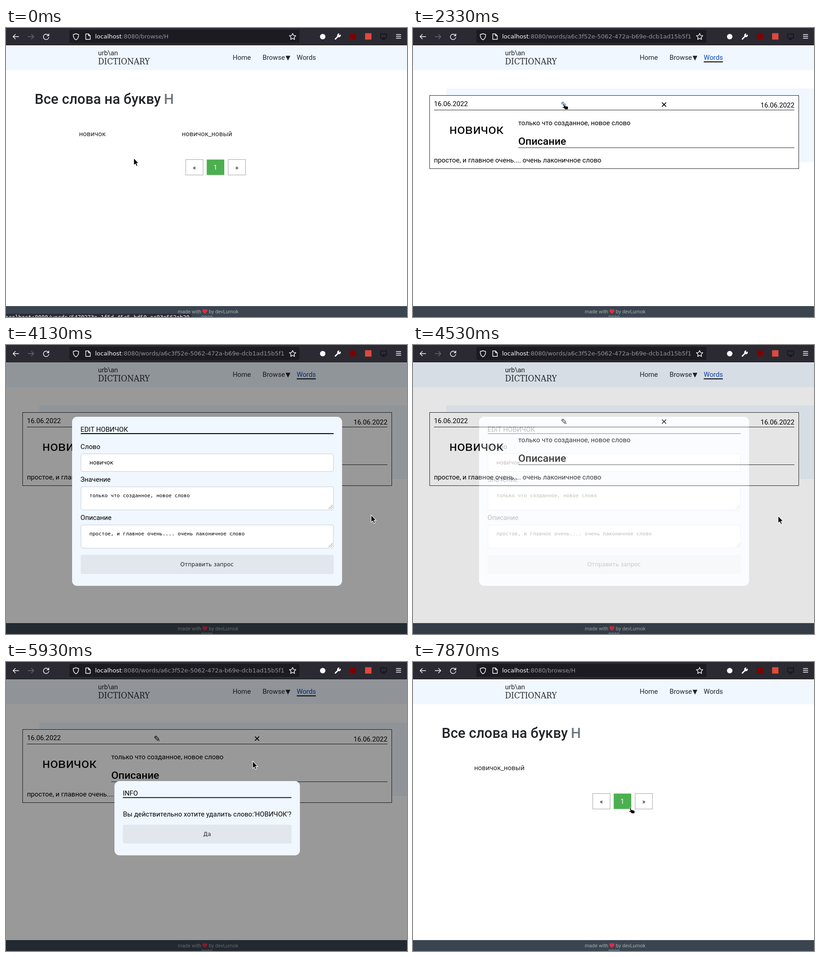
Write an HTML page that moves like this. It is 880 px wide and 636 px high and loops after 8000 ms.

```html
<!DOCTYPE html>
<html lang="ru">
<head>
<meta charset="utf-8">
<title>Dictionary</title>
<style>
html, body { margin: 0; width: 100%; height: 100%; overflow: hidden; background: #fff; }
svg { display: block; width: 880px; height: 636px; }
text { font: 14.8px Roboto, sans-serif; fill: #000; white-space: pre; }
.nav text, .list { fill: #212529; }
.logo { font: 18.5px "DejaVu Serif Condensed", "Noto Serif", serif; }
.h1 { font-size: 30.8px; font-weight: 500; }
.h2 { font-size: 30.2px; }
.h3 { font-size: 22.9px; font-weight: 500; }
.sym { font: 17.8px "DejaVu Sans", sans-serif; }
.caret { font: 13.8px "DejaVu Sans", sans-serif; }
.ui { font: 12.2px "DejaVu Sans", sans-serif; }
.mono { font: 11.1px "DejaVu Sans Mono", monospace; }
.status { font: 12px "DejaVu Sans Mono", monospace; fill: #fbfbfe; }
.url { font: 13px "DejaVu Sans", sans-serif; fill: #93929c; }
.foot text { font-size: 11.1px; fill: #a7abb0; }
.mid { text-anchor: middle; }
.end { text-anchor: end; }
.icon { fill: none; stroke: #fbfbfe; stroke-width: 1.4; stroke-linecap: round; stroke-linejoin: round; }
.rule { stroke: #000; stroke-width: 1.8; fill: none; }
.line { stroke: #212529; fill: #fff; }
.field { fill: #fff; stroke: #c8ccd1; }
.grip { stroke: #777; stroke-width: 1; fill: none; }
.panel { fill: #f0f7ff; }
.button { fill: #e2e6ed; }
.cursor path { fill: #000; stroke: #fff; stroke-width: 1; stroke-linejoin: round; }
</style>
</head>
<body>
<svg viewBox="0 0 880 636">
  <rect width="880" height="636" fill="#fff"/>

  <g id="browse">
    <text class="h1" x="63" y="167" style="fill:#212529">Все слова на букву</text>
    <text class="h1" x="346.5" y="167" style="fill:#6c757d">Н</text>
    <text id="first" class="list mid" x="189.5" y="238">новичок</text>
    <text id="second" class="list mid" y="238">новичок_новый</text>
    <g fill="#fff" stroke="#a3a3a3">
      <rect x="394.5" y="289.5" width="38" height="34"/>
      <rect x="440.5" y="289.5" width="38.5" height="34" fill="#4caf50" stroke="none"/>
      <rect x="487.5" y="289.5" width="38" height="34"/>
    </g>
    <text class="mid" x="413.5" y="312">«</text>
    <text class="mid" x="459.5" y="312" style="fill:#fff">1</text>
    <text class="mid" x="506.5" y="312">»</text>
  </g>

  <g id="word">
    <rect class="panel" x="73" y="133" width="807" height="162"/>
    <rect class="line" x="36.5" y="148.5" width="810" height="161"/>
    <text x="46" y="172">16.06.2022</text>
    <text id="pencil" class="sym mid" x="331.5" y="175">✎</text>
    <text id="cross" class="sym mid" x="551" y="175">✕</text>
    <text class="end" x="837" y="175">16.06.2022</text>
    <path class="line" d="M46 180.5H837M231 263.5H837"/>
    <text class="h2" x="79.5" y="233">новичок</text>
    <text x="231" y="213.5">только что созданное, новое слово</text>
    <text class="h3" x="231" y="257">Описание</text>
    <text x="46" y="296">простое, и главное очень.... очень лаконичное слово</text>
  </g>

  <g class="nav">
    <rect class="panel" y="38" width="880" height="55"/>
    <text x="202" y="60">urb\an</text>
    <text class="logo" x="202" y="80">DICTIONARY</text>
    <text x="497.5" y="70">Home</text>
    <text x="563" y="70">Browse</text>
    <text class="caret" x="613.5" y="70">▼</text>
    <text id="words" x="638" y="70">Words</text>
    <path id="underline" class="rule" d="M638 74.5H680"/>
  </g>

  <g class="foot">
    <rect y="612" width="880" height="24" fill="#3a4550"/>
    <text x="377" y="628">made with</text>
    <path d="M436.5 629C433 626 431 624.2 431 621.9C431 618.4 435.3 617.8 436.5 620.6C437.7 617.8 442 618.4 442 621.9C442 624.2 440 626 436.5 629Z" fill="#dd2e44"/>
    <text x="445" y="628">by devLumok</text>
    <text class="mid" x="441" y="641">2022</text>
  </g>

  <g id="status">
    <path d="M0 629H404Q407 629 407 632V636H0Z" fill="#2b2a33"/>
    <text id="link" class="status" x="-9" y="641"></text>
  </g>

  <g id="edit">
    <rect y="38" width="880" height="598" opacity=".4"/>
    <rect class="panel" x="145" y="158" width="592.5" height="372" rx="11"/>
    <text x="163.5" y="190.5">EDIT НОВИЧОК</text>
    <path class="rule" d="M164 195H719"/>
    <text x="163.5" y="228.5">Слово</text>
    <rect class="field" x="164.5" y="239.5" width="554" height="39" rx="3.5"/>
    <text class="ui" x="183" y="263">новичок</text>
    <text x="163.5" y="300.5">Значение</text>
    <rect class="field" x="164.5" y="312" width="554" height="51" rx="3.5"/>
    <text class="mono" x="183" y="335">только что созданное, новое слово</text>
    <text x="163.5" y="384.5">Описание</text>
    <rect class="field" x="164.5" y="396" width="554" height="51" rx="3.5"/>
    <text class="mono" x="183" y="419">простое, и главное очень.... очень лаконичное слово</text>
    <path class="grip" d="M708 361L717 352M712 361L717 356M708 445L717 436M712 445L717 440"/>
    <rect class="button" x="164" y="462" width="555" height="42" rx="4"/>
    <text class="ui mid" x="441" y="487" style="fill:#212529">Отправить запрос</text>
  </g>

  <g id="confirm">
    <rect y="38" width="880" height="598" opacity=".4"/>
    <rect class="panel" x="238" y="262" width="407" height="163.5" rx="11"/>
    <text x="256.5" y="294">INFO</text>
    <path class="rule" d="M256.5 298.3H626.5"/>
    <text class="mid" x="441.5" y="339.5">Вы действительно хотите удалить слово:'НОВИЧОК'?</text>
    <rect class="button" x="256.5" y="358" width="370" height="41.5" rx="4"/>
    <text class="ui mid" x="441.5" y="382.5" style="fill:#212529">Да</text>
  </g>

  <g>
    <rect width="880" height="38" fill="#2b2a33"/>
    <rect y="37" width="880" height="1" fill="#0f0f14"/>
    <rect x="139" y="4" width="505" height="29" rx="4" fill="#1c1b22"/>
    <text class="url" x="195.5" y="23"><tspan fill="#fbfbfe">localhost</tspan><tspan id="path"></tspan></text>
    <g class="icon">
      <path d="M28 19H15.5M20.5 14L15.5 19L20.5 24"/>
      <path id="forward" d="M48.5 19H61M56 14L61 19L56 24"/>
      <path d="M93 16A6 6 0 1 0 94 20.5M94 13V17H90"/>
      <path d="M153.5 12.5L159.5 14.5C159.5 20 158 24 153.5 26C149 24 147.5 20 147.5 14.5Z"/>
      <path d="M175 13H181L185 17V25H175ZM181 13V17H185"/>
      <path d="M629 12L631.1 16.4L636 17L632.4 20.4L633.3 25.2L629 22.8L624.7 25.2L625.6 20.4L622 17L626.9 16.4Z"/>
      <path d="M722.8 24.2L729 18" stroke-width="3"/>
      <path d="M734 15.2A3.4 3.4 0 1 1 730.8 12.8L729.8 15.5L731.3 17Z" fill="#fbfbfe"/>
      <path d="M822 13H835V22H822ZM828.5 22V25M825 25H832" stroke="#111116"/>
      <path d="M856.5 14.5H866.5M856.5 18.5H866.5M856.5 22.5H866.5"/>
    </g>
    <circle cx="695" cy="19" r="6" fill="#fbfbfe"/>
    <rect x="755" y="12" width="13" height="13" fill="#800000"/>
    <rect x="788" y="11.5" width="14" height="14" fill="#e0493d"/>
  </g>

  <g id="cursor" class="cursor">
    <path id="arrow" transform="translate(-.3 -1.3) scale(1.08)" d="M.5 .5V15.2L3.9 12.2L6.2 17.4L8.6 16.4L6.4 11.3H10.8Z"/>
    <path id="hand" d="M2.2 1.2Q3.6 0 4.8 1.4L6.4 5.4L11.6 6.4Q14 7 13.8 9L13 13.3H6.4L5.6 11.4L1.4 9.4Q.2 8.2 1.6 7.4L4 8Z"/>
    <path id="beam" d="M.5 .5H3L3.5 1L4 .5H6.5V2H4.3V16H6.5V17.5H4L3.5 17L3 17.5H.5V16H2.7V2H.5Z" stroke-width=".5"/>
  </g>
</svg>
<script>
const LOOP = 8000;
const WORD_ID = 'a6c3f52e-5062-472a-b69e-dcb1ad15b5f1';
const OTHER_ID = '5470273e-1f5d-45c5-bd50-ec83e562eb20';
const $ = id => document.getElementById(id);
const show = (id, on) => { $(id).style.display = on ? '' : 'none'; };
const within = (t, from, to) => t >= from && t < to;

// Pointer moves: start, end, number of steps, x, y, shape on arrival
const moves = [
  [0, 0, 1, 280, 287, 'arrow'],
  [70, 70, 1, 252, 262, 'arrow'],
  [400, 600, 4, 168, 234, 'hand'],
  [800, 1600, 12, 350, 160, 'arrow'],
  [1670, 1740, 2, 390, 167, 'arrow'],
  [1800, 1870, 2, 375, 164, 'arrow'],
  [2200, 2330, 2, 327, 166, 'hand'],
  [2730, 2870, 2, 358, 222, 'arrow'],
  [3000, 3130, 2, 382, 350, 'beam'],
  [3270, 3270, 1, 396, 352, 'beam'],
  [3530, 3600, 2, 540, 395, 'beam'],
  [3740, 3800, 2, 663, 374, 'beam'],
  [4000, 4130, 3, 801, 375, 'arrow'],
  [4270, 4330, 2, 801, 377, 'arrow'],
  [4670, 5200, 7, 547, 175, 'hand'],
  [5930, 5930, 1, 541, 219, 'arrow'],
  [6330, 6330, 1, 466, 364, 'hand'],
  [6530, 6530, 1, 469, 366, 'hand'],
  [6930, 7000, 2, 471, 367, 'arrow'],
  [7870, 7870, 1, 473, 320, 'hand']
];

// Opacity changes in hard steps: time, value
const editFade = [[0, 0], [2730, .4], [2870, .97], [3000, 1], [4530, .25], [4670, 0]];
const confirmFade = [[0, 0], [5930, .995], [6330, 1], [6930, .3], [7000, 0]];
const held = (steps, t) => steps.filter(s => s[0] <= t).pop()[1];

function pointerAt(t) {
  const i = moves.filter(m => m[0] <= t).length - 1;
  const [start, end, steps, x, y, shape] = moves[i];
  if (t >= end) return { x, y, shape };
  const done = Math.floor((t - start) / (end - start) * (steps - 1)) + 1;
  const p = done / steps;
  const [, , , fromX, fromY] = moves[i - 1];
  return {
    x: fromX + (x - fromX) * p,
    y: fromY + (y - fromY) * p,
    shape: shape === 'hand' ? 'arrow' : shape
  };
}

function fade(id, opacity) {
  show(id, opacity > 0);
  $(id).setAttribute('opacity', opacity);
}

function render(t) {
  const onWord = within(t, 870, 7000);
  const deleted = t >= 7000;

  show('browse', !onWord);
  show('word', onWord);
  show('first', !deleted);
  $('second').setAttribute('x', deleted ? 189.5 : 441);
  $('path').textContent = onWord ? ':8080/words/' + WORD_ID : ':8080/browse/Н';
  $('forward').setAttribute('stroke', deleted ? '#fbfbfe' : '#6b6a72');

  $('words').style.fill = onWord ? '#0b48b8' : '';
  show('underline', onWord);
  $('pencil').style.fill = within(t, 2330, 2730) ? '#2456c0' : '';
  $('cross').style.fill = within(t, 5200, 5930) ? '#cc0000' : '';

  show('status', t < 870);
  $('link').textContent = 'localhost:8080/words/' + (t < 530 ? OTHER_ID : WORD_ID);

  fade('edit', held(editFade, t));
  fade('confirm', held(confirmFade, t));

  const pointer = pointerAt(t);
  $('cursor').setAttribute('transform', `translate(${pointer.x} ${pointer.y})`);
  for (const shape of ['arrow', 'hand', 'beam']) show(shape, shape === pointer.shape);
}

const origin = performance.now();
function tick() {
  render((performance.now() - origin) % LOOP);
  requestAnimationFrame(tick);
}
tick();
</script>
</body>
</html>
```
